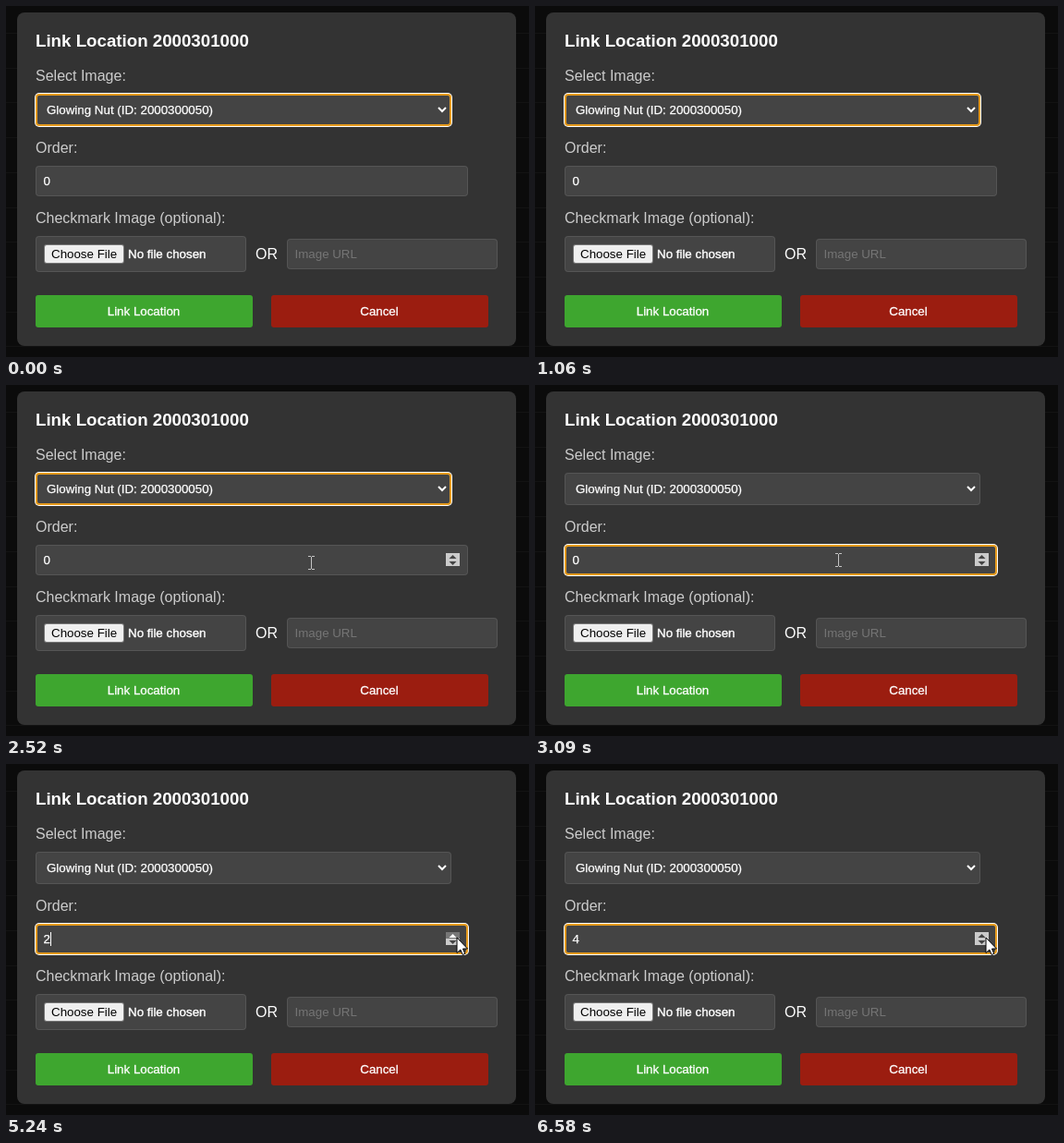
Recreate the animation shown at these times as an HTML page with a canvas. Size 566x380 px, loop 6610 ms.

```html
<!DOCTYPE html>
<html lang="en">
<head>
<meta charset="utf-8">
<title>Link Location</title>
<style>
html, body { margin: 0; width: 100%; height: 100%; overflow: hidden; background: #0b0b0b; }
canvas { display: block; }
</style>
</head>
<body>
<canvas id="stage" width="566" height="380"></canvas>
<script>
const ctx = document.getElementById('stage').getContext('2d');
const LOOP = 6610;
const FOCUS = 2590;
const CLICKS = [4660, 5180, 5580, 6000];
const PRESS = 100;
const BLINK = 500;
// time, x, y of the pointer tip
const PATH = [
  [1730, 547, 300], [2060, 375, 229], [2390, 335, 199], [2450, 333, 196],
  [2570, 328, 189], [3580, 328, 189], [4240, 489, 188], [4910, 489, 188],
  [5000, 488, 188], [LOOP, 488, 188]
];
const FONT = '"Liberation Sans", Arial, sans-serif';
const SMALL = 13.333;

function box(x, y, w, h, r, fill, border) {
  ctx.beginPath();
  ctx.roundRect(x, y, w, h, r);
  ctx.fillStyle = border || fill;
  ctx.fill();
  if (!border) return;
  ctx.beginPath();
  ctx.roundRect(x + 1, y + 1, w - 2, h - 2, r - 1);
  ctx.fillStyle = fill;
  ctx.fill();
}

function field(x, y, w, h, focused) {
  if (!focused) return box(x, y, w, h, 4, '#444', '#555');
  box(x - 1, y - 1, w + 2, h + 2, 5, '#fff');
  box(x, y, w, h, 4, '#e59a1c');
  box(x + 2, y + 2, w - 4, h - 4, 2, '#444');
}

function text(str, x, y, size, color, weight = 400, heavy = 0) {
  ctx.font = `${weight} ${size}px ${FONT}`;
  ctx.fillStyle = color;
  ctx.fillText(str, x, y);
  if (!heavy) return;
  ctx.strokeStyle = color;
  ctx.lineWidth = heavy;
  ctx.strokeText(str, x, y);
}

function shape(points, fill, stroke) {
  ctx.beginPath();
  points.forEach(([x, y]) => ctx.lineTo(x, y));
  ctx.closePath();
  ctx.fillStyle = fill;
  ctx.fill();
  if (!stroke) return;
  ctx.strokeStyle = stroke;
  ctx.lineWidth = 1;
  ctx.stroke();
}

function button(x, label, color) {
  box(x, 313, 235, 35, 3, color);
  ctx.textAlign = 'center';
  text(label, x + 117, 335, SMALL, '#fff', 400, 0.3);
  ctx.textAlign = 'left';
}

function backdrop() {
  ctx.fillStyle = '#0b0b0b';
  ctx.fillRect(0, 0, 566, 380);
  ctx.fillStyle = '#131313';
  for (let y = 29; y < 380; y += 37.7) ctx.fillRect(0, Math.round(y), 566, 1);
  box(12, 7, 540, 361, 8, '#333');
}

function selectBox(focused) {
  field(32, 95, 450, 35, focused);
  text('Glowing Nut (ID: 2000300050)', 44, 117, SMALL, '#fff', 400, 0.25);
  ctx.beginPath();
  ctx.moveTo(468, 110);
  ctx.lineTo(472, 114);
  ctx.lineTo(476, 110);
  ctx.strokeStyle = '#fff';
  ctx.lineWidth = 2;
  ctx.stroke();
}

function spinner(pressed) {
  box(476, 182, 15, 14, 0, '#cbcbcb');
  if (pressed) box(476, 182, 15, 7, 0, '#777');
  shape([[479.5, 188], [483.5, 184], [487.5, 188]], pressed ? '#fff' : '#444');
  shape([[479.5, 191], [483.5, 195], [487.5, 191]], '#444');
}

function orderBox(t, focused, hovered) {
  field(32, 173, 468, 33, focused);
  const done = CLICKS.filter(c => c <= t);
  const last = done.length ? done[done.length - 1] : FOCUS;
  text(String(done.length), 40.5, 194, SMALL, '#fff', 400, 0.25);
  if (focused && Math.floor((t - last) / BLINK) % 2 === 0) {
    ctx.fillStyle = '#fff';
    ctx.fillRect(48, 182, 1, 15);
  }
  if (focused || hovered) spinner(done.length > 0 && t - last < PRESS);
}

function pointerAt(t) {
  if (t < PATH[0][0]) return null;
  const i = PATH.findIndex(p => p[0] > t);
  const [t0, x0, y0] = PATH[i - 1];
  const [t1, x1, y1] = PATH[i];
  let k = (t - t0) / (t1 - t0);
  if (t0 === 3580) k = k * k * (3 - 2 * k);
  return { x: Math.round(x0 + (x1 - x0) * k), y: Math.round(y0 + (y1 - y0) * k) };
}

function drawPointer({ x, y }, beam) {
  ctx.save();
  ctx.translate(x, y);
  if (beam) {
    ctx.fillStyle = '#c4c4c4';
    ctx.fillRect(0, -6, 1, 13);
    for (const dy of [-7, 7]) {
      ctx.fillRect(-3, dy, 3, 1);
      ctx.fillRect(1, dy, 3, 1);
    }
  } else {
    shape([[0, 0], [0, 16.5], [3.8, 13], [6.2, 18.5], [8.8, 17.4],
      [6.5, 12], [11.5, 12]], '#fff', '#000');
  }
  ctx.restore();
}

function draw(t) {
  const p = pointerAt(t);
  const hovered = !!p && p.x >= 32 && p.x < 500 && p.y >= 173 && p.y < 206;
  const focused = t >= FOCUS;

  backdrop();
  text('Link Location 2000301000', 32, 44, 18.72, '#fff', 700);
  text('Select Image:', 32, 81, 16, '#ccc');
  selectBox(!focused);
  text('Order:', 32, 159, 16, '#ccc');
  orderBox(t, focused, hovered);

  text('Checkmark Image (optional):', 32, 235, 16, '#ccc');
  field(32, 249, 228, 39);
  box(41, 258, 87, 21, 3, '#efefef', '#767676');
  text('Choose File', 49, 273, SMALL, '#000');
  text('No file chosen', 132, 273, SMALL, '#fff', 400, 0.4);
  text('OR', 270, 274, 16, '#fff');
  field(304, 252, 228, 33);
  text('Image URL', 312.5, 273, SMALL, '#757575');

  button(32, 'Link Location', '#3ea62f');
  button(287, 'Cancel', '#9b1d10');
  if (p) drawPointer(p, hovered && p.x < 476);
}

const start = performance.now();
function tick() {
  draw((performance.now() - start) % LOOP);
  requestAnimationFrame(tick);
}
tick();
</script>
</body>
</html>
```
